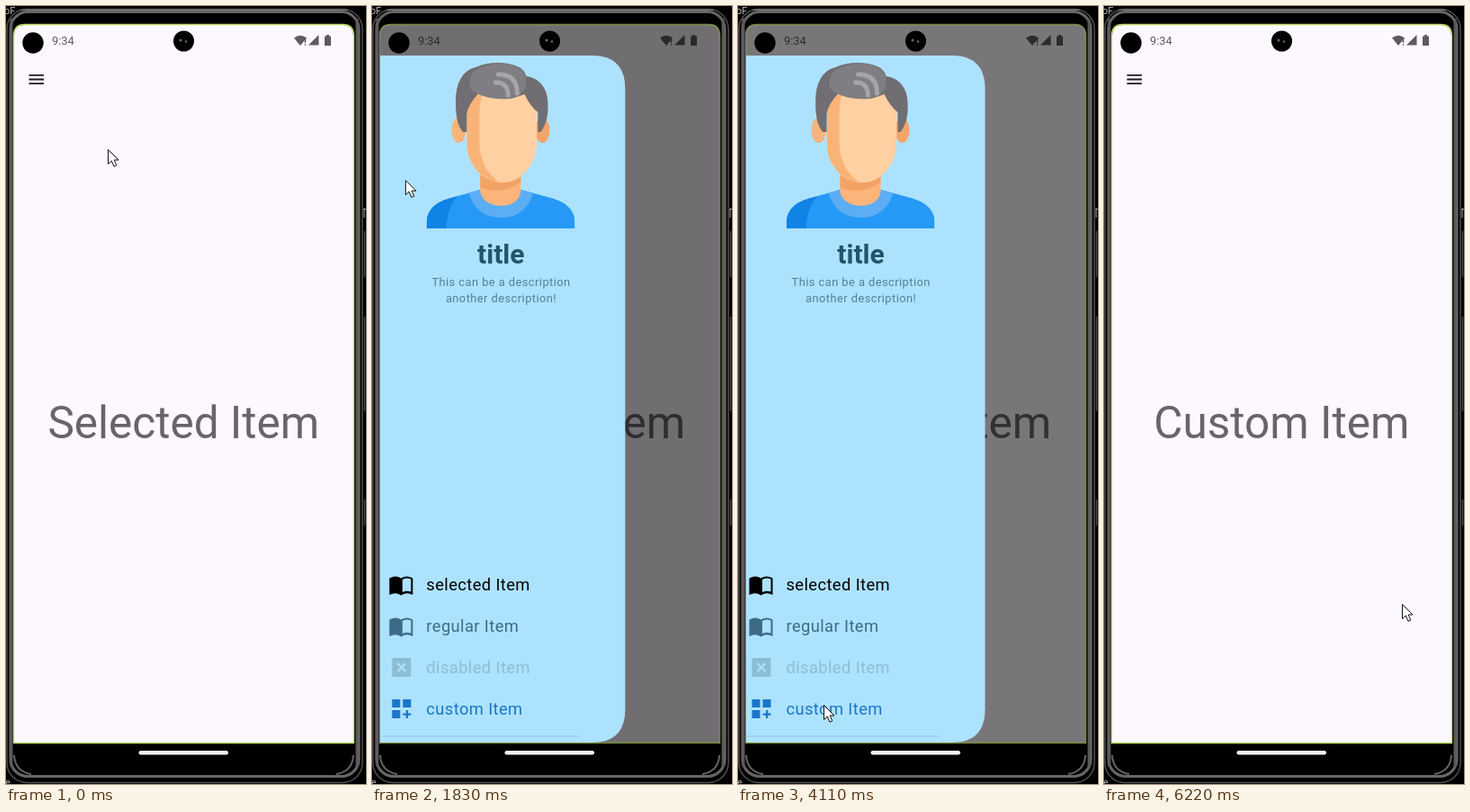
An HTML page for the animation above (6540 ms loop, 400 by 864 pixels).

```html
<!DOCTYPE html>
<html lang="en">
<head>
<meta charset="utf-8">
<title>Navigation drawer</title>
<style>
  html, body { margin: 0; width: 100%; height: 100%; overflow: hidden; background: #000; }
  svg { display: block; width: 100%; height: 100%; font-family: Roboto, sans-serif; }
  .item { font-size: 18.34px; letter-spacing: .4px; }
  .note { font-size: 12.84px; letter-spacing: .46px; fill: #557f96; }
</style>
</head>
<body>
<svg viewBox="0 0 400 864" xmlns="http://www.w3.org/2000/svg">
  <defs>
    <clipPath id="screen"><path d="M9 818V33Q9 21 21 21H374Q386 21 386 33V818Z"/></clipPath>
    <clipPath id="shirt"><path id="shirtShape" d="M63.500 247V240C64 224 76 217 91 213L123 204H168L201 213C216 217 228 225 228 240V247Z"/></clipPath>
    <clipPath id="face"><path d="M108 104Q108 88 122 88H172Q186 88 186 104V150C186 178 167 196 147 196C127 196 108 178 108 150Z"/></clipPath>
    <g id="book">
      <path d="M22 635.500Q29 631.500 35 635.500Q41 631.500 48 635.500V654Q41 650.500 35 654.500Q29 650.500 22 654Z"/>
      <path d="M36.500 637Q41 634.500 46 636.500V650.500Q41 649 36.500 651Z" fill="#ade2ff"/>
    </g>
  </defs>

  <!-- Phone body -->
  <rect width="400" height="864"/>
  <g fill="none">
    <rect x="1" y="3.500" width="395" height="859" rx="22" stroke="#514f50" stroke-width="1.500"/>
    <rect x="5" y="6.500" width="387" height="849" rx="19" stroke="#686566" stroke-width="3"/>
    <path d="M6 14V845M390 14V845" stroke="#5b595a" stroke-width="3"/>
    <path d="M16 4.500H380" stroke="#777475" stroke-width="1.500"/>
    <path d="M398.500 250V301M398.500 345V450M398.500 548V577" stroke="#4a4849" stroke-width="1.500"/>
    <path d="M397 225.500H400M398 226V235" stroke="#aaa"/>
    <path d="M9 832Q10 850 28 853M386 832Q385 850 367 853" stroke="#666" stroke-width="2"/>
  </g>
  <g fill="#bbb" font-size="11"><text x="-2" y="9">oF</text><text x="-1" y="866">e</text></g>
  <rect x="147.500" y="827" width="99.500" height="4.500" rx="2.200" fill="#f4f2f4"/>

  <g clip-path="url(#screen)">
    <rect x="8" y="20" width="379" height="799" fill="#fdf7ff"/>
    <path d="M25.500 76.800H42M25.500 81.500H42M25.500 86.200H42" stroke="#1c1b1f" stroke-width="1.800"/>
    <text id="headline" x="197.300" y="480" font-size="49.500" text-anchor="middle" fill="#686469"></text>
    <g fill="#5e5a60">
      <text x="51" y="42.500" font-size="12.840">9:34</text>
      <path d="M320 35.500Q327 30 334 35.500L327 44Z"/>
      <path d="M332.500 35V41M332.500 42.200V43.700" stroke="#5e5a60" stroke-width="1.500"/>
      <path d="M336 43.500L347.500 32V43.500ZM354 33.500H356V32H359V33.500H361V44H354Z"/>
    </g>
    <rect id="scrim" x="8" y="20" width="379" height="799"/>

    <g id="drawer">
      <path d="M-30 55H247Q284 55 284 92V781Q284 818 247 818H-30Z" fill="#ade2ff"/>
      <path d="M14 811H235" stroke="#7fb3cc" opacity=".6"/>

      <!-- Avatar -->
      <ellipse cx="99" cy="138" rx="8" ry="14" fill="#f7b47b"/>
      <ellipse cx="192" cy="138" rx="8" ry="14" fill="#f3a468"/>
      <g clip-path="url(#shirt)">
        <rect x="63" y="200" width="166" height="48" fill="#2599f5"/>
        <path d="M63 200H110Q86 215 85 248H63Z" fill="#0f83e6"/>
        <path d="M109 204Q117 235 146 235Q175 235 183 204Z" fill="#5cadf3"/>
      </g>
      <path d="M123 180H168V207Q165 221 146 222Q127 221 123 207Z" fill="#fcb47a"/>
      <path d="M123 188Q145 204 168 190V196Q148 210 123 202Z" fill="#f1a264"/>
      <g clip-path="url(#face)">
        <rect x="107" y="80" width="80" height="120" fill="#ffd0a2"/>
        <path d="M107 80H136Q122 94 122 120V152Q123 182 146 197H107Z" fill="#f9b377"/>
      </g>
      <path d="M104 140C96 132 95 114 96 98C98 80 107 70 118 68C131 62 151 61 164 67C169 69 173 73 174 78C190 80 198 93 198 108C199 122 196 132 190 140H187V118Q179 112 172 98Q146 109 121 97Q109 110 108 120V140Z" fill="#706e72"/>
      <path d="M112 92Q108 74 124 68Q148 59 166 69Q177 77 173 91Q166 105 148 103Q124 103 112 92Z" fill="#807e82"/>
      <path d="M143 76Q164 76 164 97M140 85Q153 84 154 99" fill="none" stroke="#a7a5a9" stroke-width="5" stroke-linecap="round"/>

      <g text-anchor="middle">
        <text x="146" y="286" font-size="30" font-weight="700" fill="#23546c">title</text>
        <text class="note" x="146.200" y="311">This can be a description</text>
        <text class="note" x="146.200" y="329">another description!</text>
      </g>

      <g class="item">
        <g id="first"><use href="#book"/><text x="63" y="648.500">selected Item</text></g>
        <g fill="#3d6b87"><use href="#book" y="46"/><text x="63" y="694.500">regular Item</text></g>
        <g fill="#8dbdd4">
          <path d="M25 724H46V745H25Z"/>
          <path d="M31 730L40 739M40 730L31 739" stroke="#ade2ff" stroke-width="2.200"/>
          <text x="63" y="740.500">disabled Item</text>
        </g>
        <g id="custom">
          <path d="M25 770H34V779H25ZM37 770H46V779H37ZM25 782H34V791H25ZM40.500 782H42.700V785.500H46V787.700H42.700V791H40.500V787.700H37V785.500H40.500Z"/>
          <text x="63" y="786.500">custom Item</text>
        </g>
      </g>
    </g>
  </g>

  <path id="edge" d="M8.500 818.500V33Q8.500 20.500 21 20.500H374Q386.500 20.500 386.500 33V818.500Z" fill="none" stroke="#b9d95c" stroke-width="1.300"/>
  <circle cx="30" cy="41" r="11.700"/>
  <circle cx="197.500" cy="39" r="11.500"/>
  <g fill="#66716b"><circle cx="194" cy="38" r="1.500"/><circle cx="200" cy="39.500" r="1.200"/></g>
  <path id="cursor" d="M.5 .5V16.500L4.300 13L7 19.300L9.800 18L7.200 12H12Z" fill="#fff" stroke="#111"/>
</svg>
<script>
const LOOP = 6540, SELECT = 4200, WIDTH = 275, PULL = 9.5;
const el = id => document.getElementById(id);
const set = (id, attrs) => { for (const k in attrs) el(id).setAttribute(k, attrs[k]); };
const ramp = (t, start, length) => Math.min(1, Math.max(0, (t - start) / length));
const smooth = u => u * u * (3 - 2 * u);

// Material standard curve: cubic-bezier(.4, 0, .2, 1)
function standard(u) {
  let lo = 0, hi = 1;
  for (let i = 0; i < 18; i++) {
    const s = (lo + hi) / 2, r = 1 - s;
    const x = 1.2 * r * r * s + 0.6 * r * s * s + s * s * s;
    if (x < u) lo = s; else hi = s;
  }
  return smooth((lo + hi) / 2);
}

// Pointer path: time, x, y
const path = [
  [0, 113, 159], [50, 113, 159], [480, 53, 98], [620, 53, 98], [870, 31, 84],
  [1070, 30, 82], [1370, 30, 82], [1640, 35, 164], [1730, 35, 172],
  [2330, 60, 453], [2780, 61, 462], [3410, 88, 678], [3660, 92, 692],
  [4100, 95, 776], [4250, 95, 776], [4810, 327, 681], [4960, 331, 668],
  [5110, 331, 664], [LOOP, 331, 664]
];

function pointer(t) {
  const i = path.findIndex(p => p[0] > t);
  const a = path[i - 1], b = path[i];
  const u = smooth(ramp(t, a[0], b[0] - a[0]));
  return [a[1] + (b[1] - a[1]) * u, a[2] + (b[2] - a[2]) * u];
}

function draw(t) {
  const open = standard(ramp(t, 1370, 256)) - standard(ramp(t, 5270, 256));
  const pull = smooth(ramp(t, 1740, 260)) - smooth(ramp(t, SELECT, 200));
  const chosen = t >= SELECT;
  set('drawer', { transform: `translate(${-(WIDTH + 4) * (1 - open) - PULL * pull} 0)` });
  set('scrim', { opacity: open * (0.565 - 0.045 * pull) });
  set('edge', { opacity: 1 - 0.4 * open });
  set('first', { fill: chosen ? '#3d6b87' : '#000' });
  set('custom', { fill: chosen ? '#fff' : '#1b75c9' });
  set('cursor', { transform: `translate(${pointer(t)})` });
  el('headline').textContent = chosen ? 'Custom Item' : 'Selected Item';
}

const began = performance.now();
function tick() {
  draw((performance.now() - began) % LOOP);
  requestAnimationFrame(tick);
}
tick();
</script>
</body>
</html>
```
